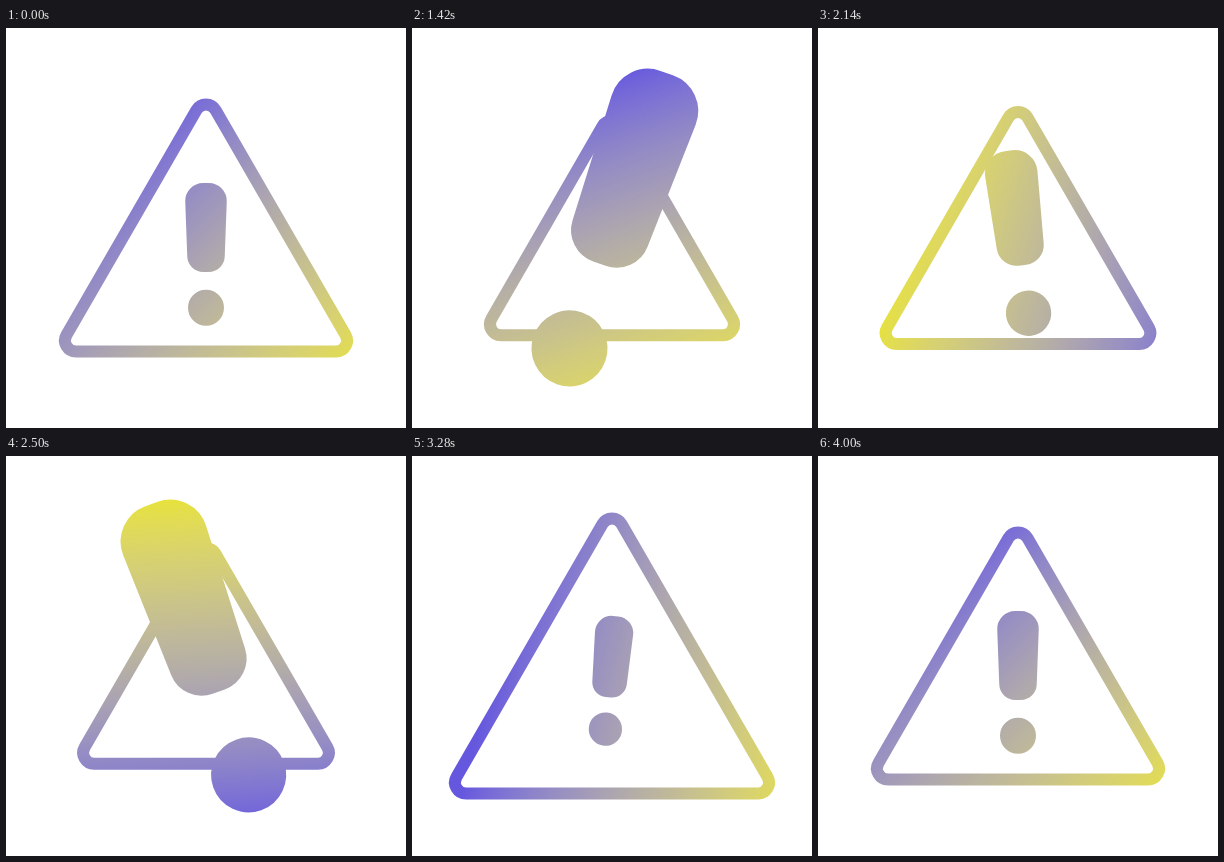
Recreate the animation shown at these times as an HTML page with a canvas. Size 400 by 400 pixels, loop 4.03 s.

```html
<!DOCTYPE html>
<html lang="en">
<head>
<meta charset="utf-8">
<title>Warning sign</title>
<style>
  html, body { margin: 0; width: 100%; height: 100%; overflow: hidden; background: #fff; }
  canvas { display: block; width: 400px; height: 400px; }
</style>
</head>
<body>
<canvas id="stage" width="400" height="400"></canvas>
<script>
const canvas = document.getElementById('stage');
const ctx = canvas.getContext('2d');
const ratio = window.devicePixelRatio || 1;
canvas.width = canvas.height = 400 * ratio;

const LOOP = 4030, PAUSE = 1000, STEP = 30, ACTIVE = 3000;
const OUTLINE = 12, MARK_EDGE = 7;
const PURPLE = [102, 88, 222], YELLOW = [232, 227, 55];

// Shared beats of the bulge, then the value of each property at every beat
const beats = [0, 410, 1000, 1560, 2200, 2570, 3000];
const markScale = [1, 2.38, 1.14, 2.38, 0.895, 1, 1];
const markDrop = [26.5, 1, 18, 1, 25, 26.5, 26.5];
const signWidth = [294, 256, 280, 257, 330, 294, 294];
const tiltBeats = [0, 470, 1560, 2250, 2750, 3000];
const tilt = [0, 20, -20, 5.2, 0, 0];

const rad = deg => deg * Math.PI / 180;
const ease = u => (1 - Math.cos(Math.PI * u)) / 2;

function tween(t, times, values) {
  let i = 0;
  while (i < times.length - 2 && t >= times[i + 1]) i++;
  const u = (t - times[i]) / (times[i + 1] - times[i]);
  return values[i] + (values[i + 1] - values[i]) * ease(u);
}

// Closed polygon with corners given as [x, y, radius]
function roundedPath(corners) {
  const last = corners[corners.length - 1], first = corners[0];
  ctx.beginPath();
  ctx.moveTo((last[0] + first[0]) / 2, (last[1] + first[1]) / 2);
  corners.forEach(([x, y, r], i) => {
    const [nx, ny] = corners[(i + 1) % corners.length];
    ctx.arcTo(x, y, nx, ny, r);
  });
  ctx.closePath();
}

// Mixes in linear light, which keeps the middle of the gradient pale
function mix(u) {
  const channels = PURPLE.map((p, i) =>
    Math.round((p ** 2.2 * (1 - u) + YELLOW[i] ** 2.2 * u) ** (1 / 2.2)));
  return `rgb(${channels})`;
}

// One gradient lies across the whole picture and turns once per loop
function gradientAt(t) {
  const u = t / ACTIVE;
  const angle = rad(45 + 360 * ease(u + 0.075 * Math.sin(Math.PI * u)));
  const dx = 170 * Math.cos(angle), dy = 170 * Math.sin(angle);
  const gradient = ctx.createLinearGradient(260 - dx, 205 - dy, 260 + dx, 205 + dy);
  for (let i = 0; i <= 16; i++) gradient.addColorStop(i / 16, mix(i / 16));
  return gradient;
}

function signPath(t) {
  const half = (tween(t, beats, signWidth) - 34) / 2;
  const reach = 2 * half / Math.sqrt(3) + 22;
  const cy = 200 + half * Math.sqrt(3) / 6;
  roundedPath([-90, 30, 150].map(deg =>
    [200 + reach * Math.cos(rad(deg)), cy + reach * Math.sin(rad(deg)), 11]));
}

// Paints the current path in screen space, so edges and colours do not scale
function paintMark(fillStyle) {
  ctx.save();
  ctx.setTransform(ratio, 0, 0, ratio, 0, 0);
  ctx.fillStyle = ctx.strokeStyle = fillStyle;
  ctx.lineWidth = MARK_EDGE;
  ctx.fill();
  ctx.stroke();
  ctx.restore();
}

function draw(now) {
  const elapsed = Math.max(0, now % LOOP - PAUSE);
  const t = Math.min(ACTIVE, Math.floor(elapsed / STEP) * STEP);
  const gradient = gradientAt(t);
  const scale = tween(t, beats, markScale);

  ctx.setTransform(ratio, 0, 0, ratio, 0, 0);
  ctx.clearRect(0, 0, 400, 400);
  ctx.lineJoin = 'round';

  signPath(t);
  ctx.strokeStyle = gradient;
  ctx.lineWidth = OUTLINE;
  ctx.stroke();

  ctx.translate(200, 200);
  ctx.rotate(rad(tween(t, tiltBeats, tilt)));
  ctx.translate(0, tween(t, beats, markDrop));
  ctx.scale(scale, scale);

  roundedPath([[-17.8, -68, 14.5], [17.8, -68, 14.5], [14.8, 14, 12.5], [-14.8, 14, 12.5]]);
  paintMark(gradient);
  ctx.beginPath();
  ctx.arc(0, 53.25, 14.5, 0, 2 * Math.PI);
  paintMark(gradient);
}

const start = performance.now();
function loop() {
  draw(performance.now() - start);
  requestAnimationFrame(loop);
}
loop();
</script>
</body>
</html>
```
